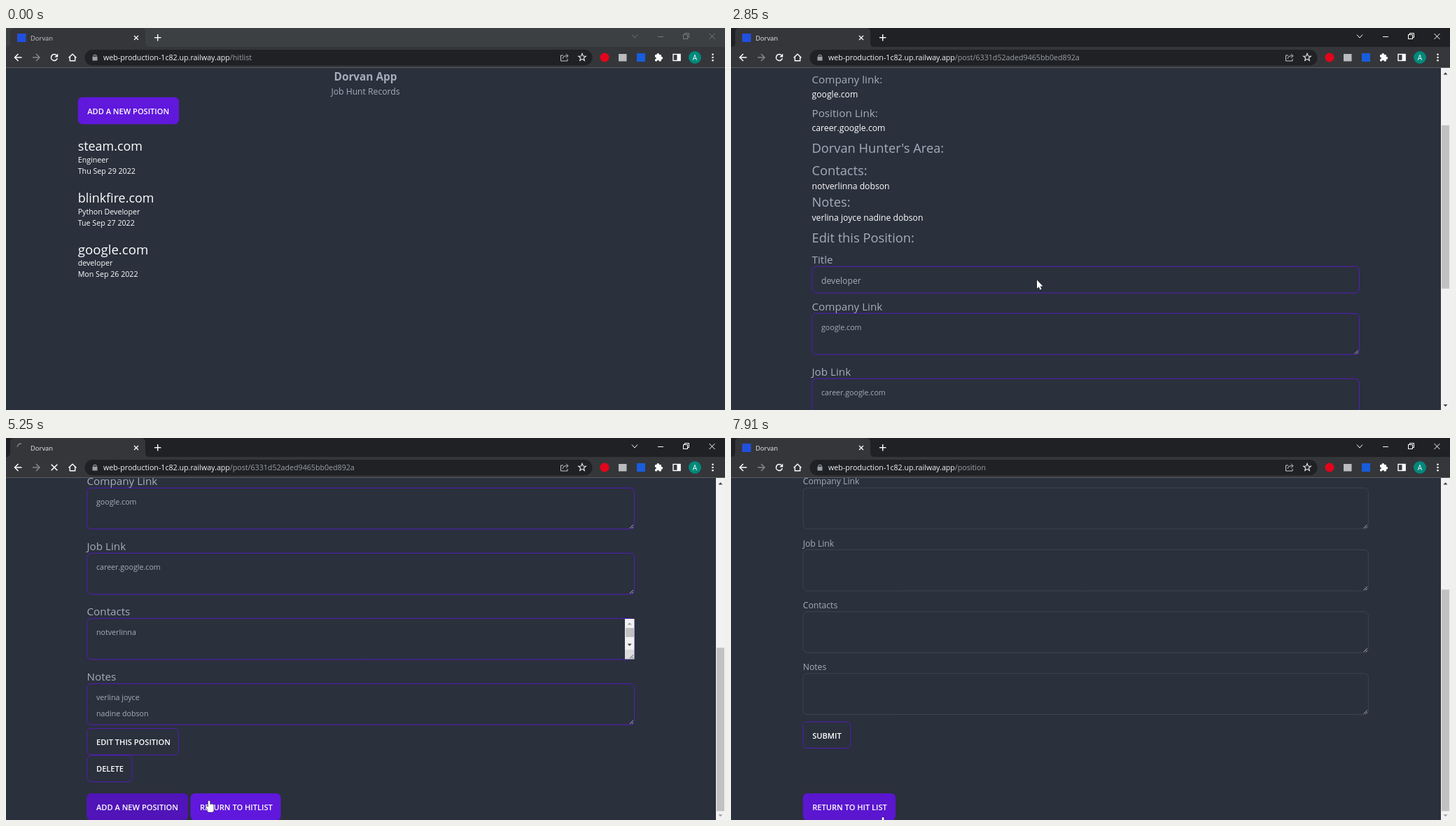
Write an HTML page with a canvas that moves like this. It is 1027 px wide and 545 px high and loops after 7990 ms.

```html
<!DOCTYPE html>
<html lang="en">
<head>
<meta charset="utf-8">
<title>Job Hunt Records</title>
<style>
html, body { margin: 0; width: 100%; height: 100%; overflow: hidden; background: #2a303c; }
canvas { display: block; }
</style>
</head>
<body>
<canvas id="stage" width="1027" height="545"></canvas>
<script>
const c = document.getElementById('stage').getContext('2d');
const LOOP = 7990, W = 1027, H = 545, TOP = 57;
const BG = '#2a303c', GREY = '#a6adbb', WHITE = '#fff';
const PURPLE = '#6018dc', DEEP = '#5014b8', DIM = '#434955';
const APP = 'Dorvan';

// ---- helpers ----
const clamp = v => Math.max(0, Math.min(1, v));
const ramp = (t, a, b) => clamp((t - a) / (b - a));

// piecewise linear track of [time, ...values]
function track(keys, t) {
  let i = 0;
  while (i < keys.length - 2 && t > keys[i + 1][0]) i++;
  const [a, b] = [keys[i], keys[i + 1]], k = ramp(t, a[0], b[0]);
  return a.slice(1).map((v, j) => v + (b[j + 1] - v) * k);
}

// y is the middle of the line; returns the advance width
function text(s, x, y, size, color = GREY, weight = 400, align = 'left') {
  const fit = weight === 600 ? 0.99 : weight === 700 ? 0.96 : 0.952;
  c.font = `${weight} ${(size * fit).toFixed(2)}px "Open Sans", "Noto Sans", sans-serif`;
  c.textAlign = align;
  c.fillStyle = color;
  c.fillText(s, x, y + size * 0.365);
  return c.measureText(s).width;
}

function rect(x, y, w, h, color) {
  c.fillStyle = color;
  c.fillRect(x, y, w, h);
}

function round(x, y, w, h, r, fill) {
  c.beginPath();
  c.roundRect(x, y, w, h, r);
  c.fillStyle = fill;
  c.fill();
}

// thin border lying inside the box
function outline(x, y, w, h, color) {
  c.beginPath();
  c.roundRect(x + 0.4, y + 0.4, w - 0.8, h - 0.8, 6);
  c.strokeStyle = color;
  c.lineWidth = 0.8;
  c.stroke();
}

function disc(x, y, r, color) {
  c.beginPath();
  c.arc(x, y, r, 0, 7);
  c.fillStyle = color;
  c.fill();
}

function trace(pts, close) {
  c.beginPath();
  pts.forEach(([x, y]) => c.lineTo(x, y));
  if (close) c.closePath();
}

function line(color, width, ...pts) {
  trace(pts);
  c.strokeStyle = color;
  c.lineWidth = width;
  c.stroke();
}

function poly(color, ...pts) {
  trace(pts, true);
  c.fillStyle = color;
  c.fill();
}

function cross(x, y, r, color, width = 1.3) {
  line(color, width, [x - r, y - r], [x + r, y + r]);
  line(color, width, [x + r, y - r], [x - r, y + r]);
}

// ---- page parts ----
function button(label, x, y, w, hover = 0) {
  round(x, y, w, 38.5, 6.4, PURPLE);
  c.globalAlpha = hover;
  round(x, y, w, 38.5, 6.4, DEEP);
  c.globalAlpha = 1;
  text(label, x + 13.5, y + 20, 11.2, WHITE, 600);
}

function outlineButton(label, x, y, w) {
  outline(x, y, w, 38.5, PURPLE);
  text(label, x + 13.5, y + 20, 11.2, WHITE, 600);
}

function grip(x, y, color) {
  line(color, 0.9, [x - 7, y - 1.5], [x - 2, y - 6.5]);
  line(color, 0.9, [x - 4, y - 1.5], [x - 2, y - 3.5]);
}

function area(x, y, w, color, lines = []) {
  outline(x, y, w, 59.4, color);
  grip(x + w, y + 59.4, '#c5c8ce');
  lines.forEach((s, i) => text(s, x + 13.5, y + 20 + i * 22.4, 11.2));
}

function header(x) {
  text(APP + ' App', x, 69, 16, GREY, 700, 'center');
  text('Job Hunt Records', x, 90, 12.8, GREY, 400, 'center');
}

function tri(x, y, dir, color) {
  poly(color, [x - 3, y + 1.5 * dir], [x + 3, y + 1.5 * dir], [x, y - 1.8 * dir]);
}

function scrollbar(pos, total) {
  const view = H - TOP, max = total - view, k = 463 / total;
  rect(1014, TOP, 13, view, '#f1f1f1');
  rect(1015, 69.3 + pos * k, 11, view * k, '#c1c1c1');
  tri(1020.5, 65, 1, pos < 1 ? '#a3a3a3' : '#404040');
  tri(1020.5, 538.5, -1, pos > max - 1 ? '#a3a3a3' : '#404040');
}

// ---- pages ----
function listPage() {
  header(513.5);
  button('ADD A NEW POSITION', 102.7, 98.7, 144.4);
  [['steam.com', 18.8, 'Engineer', 'Thu Sep 29 2022'],
   ['blinkfire.com', 18.8, 'Python Developer', 'Tue Sep 27 2022'],
   ['google.com', 19.6, 'developer', 'Mon Sep 26 2022']
  ].forEach(([site, size, job, date], i) => {
    const y = 168 + i * 73.7;
    text(site, 102.7, y, size, WHITE);
    text(job, 102.7, y + 20, 11.2, WHITE);
    text(date, 102.7, y + 36, 11.2, WHITE);
  });
}

function postPage(t) {
  const x = 115.5, w = 782.4;
  header(507);
  [['Title:', 'developer', 170.5], ['Company link:', 'google.com', 218.5],
   ['Position Link:', 'career.google.com', 266.6]
  ].forEach(([label, value, y]) => {
    text(label, x, y, 16);
    text(value, x, y + 21.5, 12.8, WHITE);
  });
  text(APP + " Hunter's Area:", x, 317, 19.2);
  text('Contacts:', x, 349, 19.2);
  text('notverlinna dobson', x, 371, 12.8, WHITE);
  text('Notes:', x, 394, 19.2);
  text('verlina joyce nadine dobson', x, 416, 12.8, WHITE);
  text('Edit this Position:', x, 445, 19.2);

  text('Title', x, 475.3, 16);
  outline(x, 485.4, w, 38.5, PURPLE);
  text('developer', x + 13.5, 505.6, 12.8);
  [['Company Link', 'google.com'], ['Job Link', 'career.google.com'],
   ['Contacts', 'notverlinna'], ['Notes', 'verlina joyce', 'nadine dobson']
  ].forEach(([label, ...lines], i) => {
    const y = 552.4 + i * 93.05;
    text(label, x, y - 9.8, 16);
    area(x, y, w, PURPLE, lines);
  });

  rect(884, 739.5, 13.5, 44, '#f1f1f1');
  rect(885, 752.5, 12, 13, '#c1c1c1');
  rect(884, 783.5, 13.5, 13.5, '#dcdcdc');
  tri(890.7, 746.5, 1, '#a3a3a3');
  tri(890.7, 776.5, -1, '#404040');
  grip(898, 797.5, '#404040');

  outlineButton('EDIT THIS POSITION', x, 895.4, 131.4);
  outlineButton('DELETE', x, 933.9, 65);
  button('ADD A NEW POSITION', x, 988.5, 144.4, ramp(t, 4820, 4980));
  button('RETURN TO HITLIST', 263.5, 988.5, 129, ramp(t, 4560, 4720) - ramp(t, 4820, 4980));
}

function formPage(t) {
  const x = 102.7, w = 808;
  header(507);
  [['User Name', 'abel', 109.5], ['Email', 'abeltornfield@example.com', 128.5]
  ].forEach(([label, value, y]) => {
    const lw = text(label, x, y, 12.8, GREY, 700);
    text(': ' + value, x + lw, y, 12.8);
  });
  button('LOGOUT', x, 137.5, 71.4);
  text('Add a position', x, 202, 12.8);
  text('Title', x, 221.5, 12.8);
  outline(x, 230.4, w, 38.5, DIM);
  ['Company Link', 'Job Link', 'Contacts', 'Notes'].forEach((label, i) => {
    const y = 297.8 + i * 88.25;
    text(label, x, y - 9, 12.8);
    area(x, y, w, DIM);
  });
  outlineButton('SUBMIT', x, 631.5, 68.5);
  button('RETURN TO HIT LIST', x, 734, 132.4, ramp(t, 7860, 8020));
}

// ---- browser frame ----
function spinner(t, start, waiting) {
  const turn = waiting ? 0.75 - (t - 1500) / 1250 : (t - start) / 500;
  const arc = waiting ? 0.22 : 0.4;
  c.beginPath();
  c.arc(22, 14, 6, (turn - arc) * 2 * Math.PI, turn * 2 * Math.PI);
  c.strokeStyle = waiting ? '#80868b' : '#8ab4f8';
  c.lineWidth = 1.3;
  c.stroke();
}

function reload() {
  c.beginPath();
  c.arc(69, 42, 4.5, 0.3, 5.4);
  c.strokeStyle = WHITE;
  c.lineWidth = 1.5;
  c.stroke();
  poly(WHITE, [74.2, 36.5], [74.2, 41.5], [69.3, 41.5]);
}

function arrow(x, dir, color) {
  line(color, 1.5, [x - 5 * dir, 42], [x + 5 * dir, 42]);
  line(color, 1.5, [x, 37], [x - 5 * dir, 42], [x, 47]);
}

function star(x, y) {
  const pts = Array.from({ length: 10 }, (_, i) => {
    const r = i % 2 ? 2.4 : 5.6, a = i * Math.PI / 5 - Math.PI / 2;
    return [x + r * Math.cos(a), y + r * Math.sin(a)];
  });
  trace(pts, true);
  c.strokeStyle = '#e8eaed';
  c.lineWidth = 1.1;
  c.stroke();
}

function windowButtons(color) {
  line(color, 1, [894, 9.5], [898, 14], [902, 9.5]);
  line(color, 1, [931, 12.5], [939, 12.5]);
  c.lineWidth = 1;
  c.strokeStyle = color;
  c.strokeRect(967.5, 9.5, 6, 6);
  line(color, 1, [969.5, 9.5], [969.5, 7.5], [975.5, 7.5], [975.5, 13.5], [973.5, 13.5]);
  cross(1008.5, 12, 4, color, 1);
}

function toolbarIcons() {
  arrow(17.5, 1, WHITE);
  arrow(43, -1, '#85878b');
  line(WHITE, 1.4, [89.5, 42.5], [95, 37.2], [100.5, 42.5]);
  line(WHITE, 1.4, [91.3, 41], [91.3, 46.8], [98.7, 46.8], [98.7, 41]);

  rect(123.5, 40.8, 7, 5.7, '#9aa0a6');
  c.beginPath();
  c.arc(127, 40.5, 2.2, Math.PI, 0);
  c.strokeStyle = '#9aa0a6';
  c.lineWidth = 1.1;
  c.stroke();

  line('#c4c7cc', 1, [796, 39], [792.5, 39], [792.5, 47], [802, 47], [802, 44]);
  line('#c4c7cc', 1, [795, 44], [796.5, 40.8], [799, 39.8], [802.5, 39.8]);
  line('#c4c7cc', 1, [800, 36.8], [803, 39.8], [800, 42.8]);
  star(823, 42);

  disc(855, 42, 6.5, '#e3051b');
  rect(875, 37, 11.5, 10.5, '#b9bbbe');
  rect(901, 36, 12, 12, '#175ddc');
  round(927, 38, 9, 9.5, 1, WHITE);
  disc(931.3, 38, 1.9, WHITE);
  disc(936.3, 42.8, 1.9, WHITE);
  disc(927.3, 42.9, 1.5, '#35363a');
  disc(931.3, 47.3, 1.5, '#35363a');
  c.lineWidth = 1.4;
  c.strokeStyle = WHITE;
  c.strokeRect(953, 37.5, 10, 9);
  rect(958.5, 37, 5, 10, WHITE);
  disc(984, 42, 9, '#00897b');
  text('A', 984, 42, 10.5, WHITE, 400, 'center');
  [37.8, 42, 46.2].forEach(y => disc(1009.5, y, 1.3, WHITE));
}

function frame(t, path, load) {
  const active = t >= 170;
  rect(0, 0, W, 27, active ? '#202124' : '#3c4043');
  rect(0, 27, W, 29, '#35363a');
  rect(0, 56, W, 1, '#5a5c60');
  c.beginPath();
  c.moveTo(0, 27);
  c.quadraticCurveTo(6, 27, 6, 21);
  c.lineTo(6, 6);
  c.quadraticCurveTo(6, 0, 12, 0);
  c.lineTo(193, 0);
  c.quadraticCurveTo(199, 0, 199, 6);
  c.lineTo(199, 21);
  c.quadraticCurveTo(199, 27, 205, 27);
  c.fillStyle = '#35363a';
  c.fill();

  if (load) spinner(t, load.commit, t < load.commit);
  else rect(16, 8, 12.5, 12, '#2150e0');
  text(APP, 35, 14, 9.9, active ? '#e8eaed' : '#c6c9ce');
  cross(186, 14, 3, WHITE);
  line(WHITE, 1.4, [212, 13.7], [221.4, 13.7]);
  line(WHITE, 1.4, [216.7, 9], [216.7, 18.4]);
  windowButtons(active ? WHITE : '#77797c');

  round(112.5, 31, 725, 22.5, 11.2, '#202124');
  const host = text('web-production-1c82.up.railway.app', 139, 42, 11.2, '#f1f3f4');
  text(path, 139 + host, 42, 11.2, '#9aa0a6');
  toolbarIcons();
  if (load) cross(69, 42, 4.3, WHITE, 1.6);
  else reload();
}

// ---- pointer ----
function pointer(x, y, scale = 1) {
  c.save();
  c.translate(x, y);
  c.scale(scale, scale);
  trace([[0, 0], [0, 12.2], [2.7, 9.7], [4.6, 14], [6.6, 13.1], [4.7, 8.9], [8.5, 8.9]], true);
  c.lineJoin = 'round';
  c.strokeStyle = '#15181e';
  c.lineWidth = 1;
  c.stroke();
  c.fillStyle = WHITE;
  c.fill();
  c.restore();
}

function hand(x, y) {
  c.save();
  c.translate(x, y);
  c.beginPath();
  c.roundRect(-1.3, 0, 2.7, 11, 1.3);
  c.roundRect(1, 5, 5.6, 6, 1.4);
  c.roundRect(-2.5, 8, 9.2, 8.3, 2.4);
  c.moveTo(-5, 8);
  c.lineTo(-3, 7.6);
  c.lineTo(-0.5, 10.5);
  c.lineTo(-0.5, 14.5);
  c.lineTo(-2, 13.5);
  c.closePath();
  c.strokeStyle = '#15181e';
  c.lineWidth = 1;
  c.stroke();
  c.fillStyle = WHITE;
  c.fill();
  c.restore();
}

const MOVES = [
  { from: 240, to: 1600, scale: 1.43, keys: [[240, 300, 423], [640, 181, 351], [800, 179, 349]] },
  { from: 1600, to: 3650, keys: [[1980, 181, 349], [2280, 320, 381], [2520, 437, 359.5]] },
  { from: 4050, to: 5570, keys: [[4050, 248, 443], [4500, 278, 500], [4770, 300, 518],
    [4900, 248, 520], [5050, 248, 520], [5170, 290, 517.5]] },
  { from: 7660, to: LOOP, keys: [[7660, 485, 412], [7910, 217, 541]] }
];

function drawPointer(t) {
  const m = MOVES.find(m => t >= m.from && t < m.to);
  if (!m) return;
  const [x, y] = track(m.keys, t);
  if (y > 507) hand(x, y);
  else pointer(x, y, m.scale);
}

// ---- timeline ----
const LOADS = [{ from: 880, commit: 1640, to: 1880 }, { from: 5010, commit: 5570, to: 5780 }];
const PAGES = [
  { until: 1640, path: '/hitlist', draw: listPage },
  { until: 5570, path: '/post/6331d52aded9465bb0ed892a', draw: postPage, total: 969.5,
    scroll: [[2640, 0], [2850, 145], [3490, 481.5]] },
  { until: LOOP, path: '/position', draw: formPage, total: 715,
    scroll: [[7050, 0], [7350, 227]] }
];

function render(t) {
  const page = PAGES.find(p => t < p.until);
  const pos = page.scroll ? track(page.scroll, t)[0] : 0;
  rect(0, 0, W, H, BG);
  c.save();
  c.translate(0, -pos);
  page.draw(t);
  c.restore();
  if (page.total) scrollbar(pos, page.total);
  frame(t, page.path, LOADS.find(l => t >= l.from && t < l.to));
  drawPointer(t);
}

const start = performance.now();
function tick() {
  render((performance.now() - start) % LOOP);
  requestAnimationFrame(tick);
}
tick();
</script>
</body>
</html>
```
